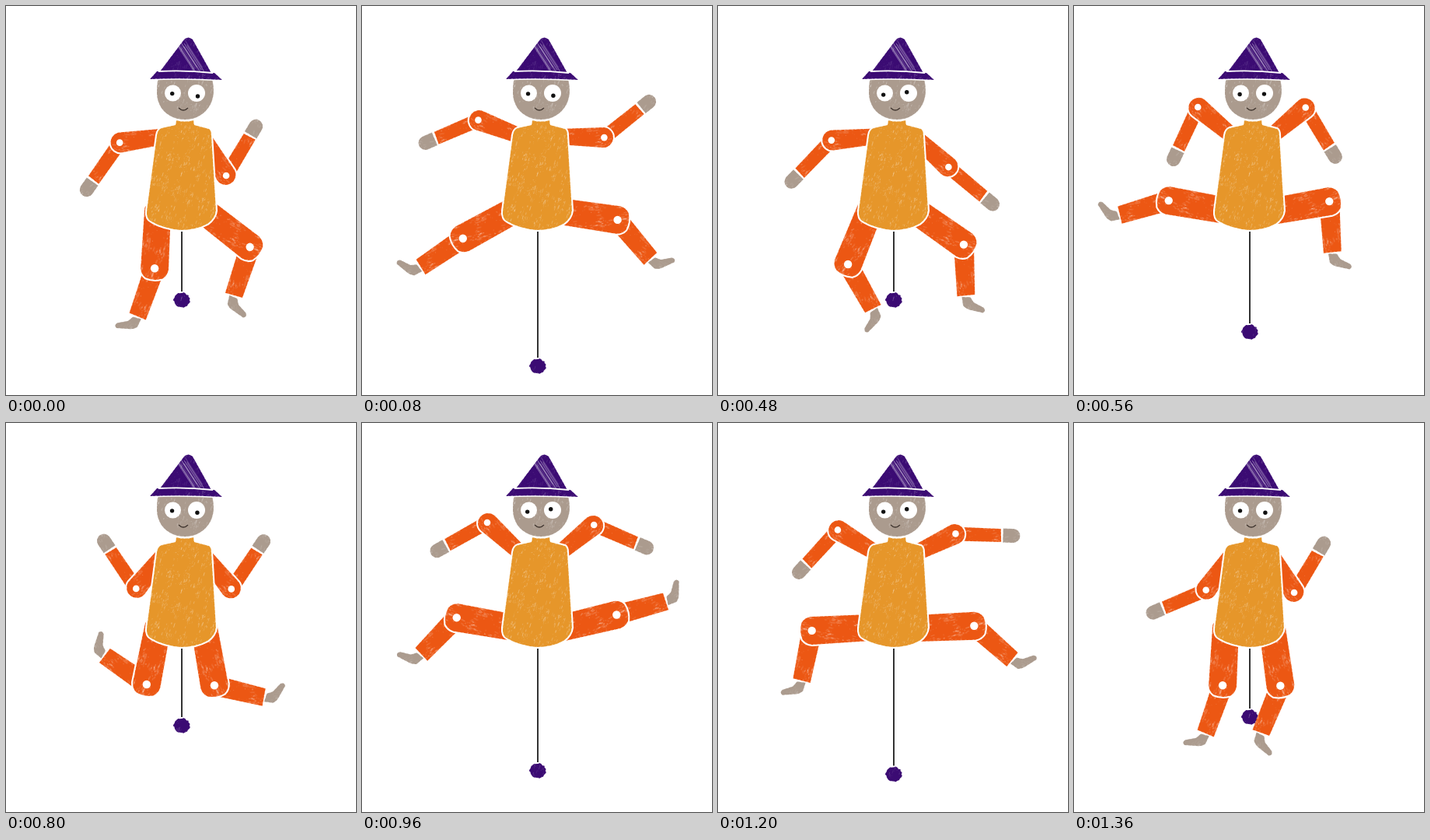
Write an HTML page with a canvas that moves like this. It is 450 px wide and 500 px high and loops after 1.44 s.

```html
<!DOCTYPE html>
<html>
<head>
<meta charset="utf-8">
<style>
  html, body { margin: 0; overflow: hidden; background: #fff; }
  canvas { display: block; }
</style>
</head>
<body>
<canvas id="stage" width="450" height="500"></canvas>
<script>
const ctx = document.getElementById('stage').getContext('2d');
const STEP = 80, STEPS = 18, MAX_PULL = 463;
const ORANGE = '#ec5713', SKIN = '#ab9b8e', VIOLET = '#3b0b73', OCHRE = '#e6962a';
const radians = degrees => degrees * Math.PI / 180;

// upper and lower angle of each limb at a few key steps
const poses = [
  { at: 0, pull: 378, arms: [172, 125, 59, -59], legs: [93, 110, 38, 108] },
  { at: 3, pull: 463, arms: [160, 220, -16, 2], legs: [169, 219, 48, -68] },
  { at: 6, pull: 378, arms: [175, 134, 42, 40], legs: [112, 61, 35, 87] },
  { at: 7, pull: 419, arms: [220, 115, -40, 59], legs: [190, 164, -10, 86] },
  { at: 10, pull: 389, arms: [129, 236, 51, -56], legs: [101, 215, 80, 13] },
  { at: 13, pull: 385, arms: [220, 108, -35, 63], legs: [185, 94, -11, -30] },
  { at: 17, pull: 378, arms: [126, 157, 59, -59], legs: [93, 110, 82, 112] }
];

// between two key poses each tug of the string lifts the limbs outward
function poseAt(step) {
  const next = Math.max(1, poses.findIndex(p => p.at >= step));
  const a = poses[next - 1], b = poses[next];
  const f = (step - a.at) / (b.at - a.at), tug = Math.sin(Math.PI * f);
  const mix = (u, v) => u + (v - u) * f;
  const swing = key => a[key].map((v, i) => mix(v, b[key][i]) + 38 * tug * [1, 0, -1, 0][i]);
  return {
    arms: swing('arms'),
    legs: swing('legs'),
    pull: Math.min(MAX_PULL, mix(a.pull, b.pull) + 70 * tug)
  };
}

function random(seed) {
  return () => (seed = (seed * 1664525 + 1013904223) % 2 ** 32) / 2 ** 32;
}

// a tile of patchy pale scratches, laid over every part
function chalkPattern() {
  const size = 160, rnd = random(5), tile = document.createElement('canvas');
  tile.width = tile.height = size;
  const c = tile.getContext('2d');
  c.strokeStyle = '#fff';
  for (let i = 0; i < 5200; i++) {
    const x = rnd() * size, y = rnd() * size, len = 0.4 + rnd() ** 3 * 5;
    const patch = Math.sin(x * 0.32 + y * 0.1) + Math.sin(y * 0.16 - x * 0.08);
    if (patch < rnd() * 3 - 0.9) continue;
    c.globalAlpha = 0.12 + rnd() * 0.4;
    c.lineWidth = 0.5 + rnd() * 0.6;
    c.beginPath();
    c.moveTo(x, y);
    c.lineTo(x + 0.3 * len, y - len);
    c.stroke();
  }
  return ctx.createPattern(tile, 'repeat');
}
const chalk = chalkPattern();

const shape = (d, color, grain, outline = 0) => ({ path: new Path2D(d), color, grain, outline });

const parts = {
  upperArm: shape('M-10 0L-13 57A13 13 0 0 0 13 57L10 0Z', ORANGE, 0.8, 4),
  foreArm: shape('M-9 0H9L8.5 59L-8.5 58Z', ORANGE, 0.8),
  hand: shape('M-9 61H9V74A9 9 0 0 1 -9 74Z', SKIN, 0.6),
  thigh: shape('M-17 0Q-17 -8 -9 -8H9Q17 -8 17 0L18 75Q17 83 11 87Q0 91 -11 87Q-17 83 -18 75Z', ORANGE, 1, 4),
  shin: shape('M-13 0H13L12 66L-11 65Z', ORANGE, 0.9),
  foot: shape('M-5 68L6 67L5 78Q3 82 -3 84L-20 89Q-25 86 -21 82L-9 75Z', SKIN, 0.4),
  body: shape('M219 147Q230 150 241 147L242 153L261 158Q264 160 264 166L270 263Q269 273 259 280Q244 288 225 288Q202 286 187 277Q180 274 181 263L194 166Q195 159 200 157L218 153Z', OCHRE, 0.7, 4),
  head: shape('M194 109C193 131 209 146 230 146S267 130 267 109Q267 99 264 92H196Q194 99 194 109Z', SKIN, 0.6),
  brim: shape('M185 94L194 84Q230 83 268 86L278 95Q230 92 185 94Z', VIOLET, 0.4, 3),
  hat: shape('M198 84L229 43Q234 38 240 43L264 86Q230 82 198 84Z', VIOLET, 0.3)
};

function paint({ path, color, grain, outline }) {
  ctx.save();
  ctx.lineJoin = 'round';
  if (outline) stroke(path, '#fff', outline);
  ctx.fillStyle = color;
  ctx.fill(path);
  ctx.globalAlpha = grain;
  ctx.fillStyle = chalk;
  ctx.fill(path);
  ctx.globalAlpha = 0.5;
  ctx.setLineDash([1, 4, 2, 3]);
  stroke(path, '#fff', 0.8);
  ctx.restore();
}

function stroke(path, color, width) {
  ctx.strokeStyle = color;
  ctx.lineWidth = width;
  ctx.stroke(path);
}

const line = (d, color, width) => stroke(new Path2D(d), color, width);

function dot(x, y, r, color) {
  ctx.fillStyle = color;
  ctx.beginPath();
  ctx.arc(x, y, r, 0, 7);
  ctx.fill();
}

function posed(x, y, angle, side, pieces) {
  ctx.save();
  ctx.translate(x, y);
  ctx.rotate(radians(angle - 90));
  ctx.scale(side, 1);
  pieces.forEach(paint);
  ctx.restore();
}

function limb(x, y, upperAngle, lowerAngle, side, { length, upper, lower, hole }) {
  const jx = x + Math.cos(radians(upperAngle)) * length;
  const jy = y + Math.sin(radians(upperAngle)) * length;
  posed(jx, jy, lowerAngle, side, lower);
  posed(x, y, upperAngle, side, [upper]);
  dot(jx, jy, hole, '#fff');
}

const arm = { length: 58.4, upper: parts.upperArm, lower: [parts.foreArm, parts.hand], hole: 4.3 };
const leg = { length: 74.4, upper: parts.thigh, lower: [parts.shin, parts.foot], hole: 5.2 };

function drawPull(y) {
  line(`M226 289V${y - 11}`, '#333', 2);
  const rnd = random(17);
  const rim = Array.from({ length: 28 }, (_, i) => {
    const a = i / 14 * Math.PI, r = 9.6 + rnd() * 1.8;
    return `${226 + Math.cos(a) * r} ${y + Math.sin(a) * r * 0.92}`;
  });
  paint(shape(`M${rim.join('L')}Z`, VIOLET, 0.4));
}

function drawHead(step) {
  const roll = Math.cos(step / STEPS * 4 * Math.PI);
  paint(parts.head);
  dot(214.5, 112, 10.5, '#fff');
  dot(245, 112, 11, '#fff');
  dot(213 + roll * 0.7, 113.6 - roll, 2.7, '#111');
  dot(244 + roll * 2.5, 112.5 + roll * 3.5, 2.7, '#111');
  line('M222 131Q228 137 234 131', '#40352f', 1.2);
  paint(parts.brim);
  paint(parts.hat);
  line('M196 84Q230 82 266 86', '#fff', 1.8);
  // worn diagonal streaks
  ctx.save();
  ctx.clip(parts.hat.path);
  const rnd = random(9);
  for (let i = 0; i < 16; i++) {
    const x = 220 + rnd() * 15, y = 44 + rnd() * 10;
    line(`M${x} ${y}l22 34`, `rgba(255,255,255,${0.15 + rnd() * 0.35})`, 0.8);
  }
  ctx.restore();
}

function draw(step) {
  const { arms: [la, lf, ra, rf], legs: [ll, ls, rl, rs], pull } = poseAt(step);
  ctx.clearRect(0, 0, 450, 500);
  drawPull(pull);
  limb(195, 263, ll, ls, 1, leg);
  limb(255, 264, rl, rs, -1, leg);
  limb(204, 167.5, la, lf, 1, arm);
  limb(253, 168, ra, rf, -1, arm);
  paint(parts.body);
  drawHead(step);
}

function tick() {
  draw(Math.floor(performance.now() / STEP) % STEPS);
  requestAnimationFrame(tick);
}
tick();
</script>
</body>
</html>
```
